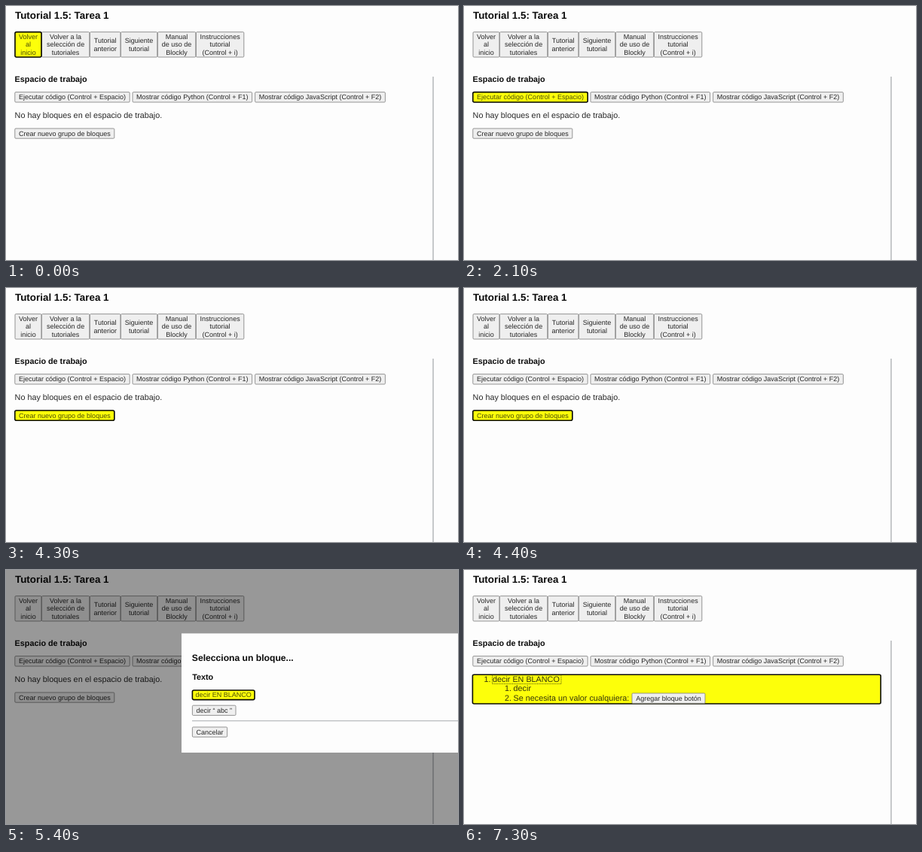
An HTML page for the animation above (7.4 s loop, 600 by 338 pixels).

```html
<!DOCTYPE html>
<html lang="es">
<head>
<meta charset="utf-8">
<title>Tutorial 1.5</title>
<style>
  html, body { margin: 0; width: 100%; height: 100%; overflow: hidden; background: #fdfdfd; }
  svg { display: block; width: 600px; height: 338px; }
  text { font: 10.8px "Liberation Sans", Arial, sans-serif; fill: #262626; text-rendering: geometricPrecision; }
  .bold { font-weight: bold; fill: #0c0c0c; }
  .button text { font-size: 9.03px; text-anchor: middle; }
  .button rect { fill: #efefef; stroke: #7c7c7c; stroke-width: .8; }
  .focused rect { fill: #fdff0a; stroke: #0c0c00; stroke-width: 1.6; }
  .focused text { fill: #4a4a08; }
  .on-yellow text { fill: #33330a; }
  .on-yellow .button text { fill: #262626; }
</style>
</head>
<body>
<svg id="stage" viewBox="0 0 600 338"></svg>
<script>
const LOOP = 7400;
const OPEN = 4500, PICK = 5200, INSERT = 6800;
const YELLOW = '#fdff0a';

const label = (x, y, str, size = 10.8, cls = '') =>
  `<text x="${x}" y="${y}" class="${cls}" style="font-size:${size}px">${str}</text>`;

const box = (x, y, w, h, fill, extra = '') =>
  `<rect x="${x}" y="${y}" width="${w}" height="${h}" fill="${fill}" ${extra}/>`;

function button([left, top, right, bottom, caption], focused = false) {
  const lines = caption.split('|');
  const cx = (left + right) / 2, cy = (top + bottom) / 2;
  const rows = lines.map((line, i) =>
    `<text x="${cx}" y="${cy + 3.1 + (i - (lines.length - 1) / 2) * 10.2}">${line}</text>`);
  return `<g class="button ${focused ? 'focused' : ''}">` +
    box(left, top, right - left, bottom - top, 'none', `rx="${focused ? 2 : 1.2}"`) +
    rows.join('') + '</g>';
}

// Content that is visible only between two moments of the loop
const during = (from, to, content) => `<g data-from="${from}" data-to="${to}">${content}</g>`;

const tools = [
  [12, 34.6, 47, 68, 'Volver|al|inicio'],
  [47.4, 34.6, 110.8, 68, 'Volver a la|selección de|tutoriales'],
  [111.4, 34.6, 152, 68, 'Tutorial|anterior'],
  [152.4, 34.6, 200.8, 68, 'Siguiente|tutorial'],
  [201.4, 34.6, 251.8, 68, 'Manual|de uso de|Blockly'],
  [252.4, 34.6, 315.8, 68, 'Instrucciones|tutorial|(Control + i)'],
  [11.8, 114.6, 164.2, 128, 'Ejecutar código (Control + Espacio)'],
  [168, 114.6, 326.6, 128, 'Mostrar código Python (Control + F1)'],
  [330.6, 114.6, 503.4, 128, 'Mostrar código JavaScript (Control + F2)'],
];
const create = [11.8, 163, 143.8, 176.2, 'Crear nuevo grupo de bloques'];
const stops = [...tools, create];
const focusTimes = [0, 400, 700, 1000, 1300, 1600, 1900, 2300, 2600, 2900, OPEN];

const page =
  label(12, 17.2, 'Tutorial 1.5: Tarea 1', 13.4, 'bold') +
  label(11.6, 100.8, 'Espacio de trabajo', 10.8, 'bold') +
  box(566.3, 94, 1.4, 244, '#aeb2b6') +
  tools.map(t => button(t)).join('');

const emptyWorkspace =
  label(11.6, 149, 'No hay bloques en el espacio de trabajo.') + button(create);

const focusRun = stops.map((s, i) =>
  during(focusTimes[i], focusTimes[i + 1], button(s, true))).join('');

function dialogBody(shift, rule, focusFirst) {
  const first = [247.4, 160, focusFirst ? 330 : 331.6, 172.6, 'decir EN BLANCO'];
  return label(246.8, 121, 'Selecciona un bloque...', 12.15, 'bold') +
    label(247.2, 145.6, 'Texto', 10.8, 'bold') +
    `<g transform="translate(0 ${shift})">` +
    button(first, focusFirst) +
    button([247.4, 180.2, 305, 193.4, 'decir “ abc ”']) +
    box(247, 200.2, 353, 1.1, rule) +
    button([247.4, 209, 293.6, 222.2, 'Cancelar']) + '</g>';
}

const focusedDialog =
  box(232.2, 83.2, 380, 162.2, '#fdfdfd', 'rx="2.5"') +
  box(233.8, 84.8, 380, 159, YELLOW, 'rx="1.5" stroke="#0c0c00" stroke-width="1.5"') +
  dialogBody(.9, '#c9c9a4', false);

const plainDialog = box(233, 84.4, 367, 158.6, '#fdfdfd') + dialogBody(0, '#aeb2b6', true);

const blockList = '<g class="on-yellow">' +
  box(11.4, 139.2, 541.8, 38.8, YELLOW, 'rx="2" stroke="#0c0c00" stroke-width="1.6"') +
  label(26.6, 149.2, '1.') + label(38, 149.2, 'decir EN BLANCO') +
  box(37.5, 139.8, 91.5, 11.7, 'none', 'stroke="#33330a" stroke-width=".9" stroke-dasharray="1 1.2"') +
  label(54, 161.3, '1.') + label(65.6, 161.3, 'decir') +
  label(54, 173.8, '2.') + label(65.6, 173.8, 'Se necesita un valor cualquiera:') +
  button([223, 164, 320, 177.4, 'Agregar bloque botón']) + '</g>';

const stage = document.getElementById('stage');
stage.innerHTML = page +
  during(0, INSERT, emptyWorkspace) +
  focusRun +
  during(OPEN, INSERT, box(0, 0, 600, 338, '#000', 'opacity=".4"')) +
  during(OPEN, PICK, focusedDialog) +
  during(PICK, INSERT, plainDialog) +
  during(INSERT, LOOP, blockList);

for (const el of stage.querySelectorAll('[data-from]')) {
  const { from, to } = el.dataset;
  const frames = [[0, 0], [from / LOOP, 1], [to / LOOP, 0], [1, 0]];
  el.animate(
    frames.map(([offset, opacity]) => ({ offset, opacity, easing: 'steps(1, end)' })),
    { duration: LOOP, iterations: Infinity });
}
</script>
</body>
</html>
```
